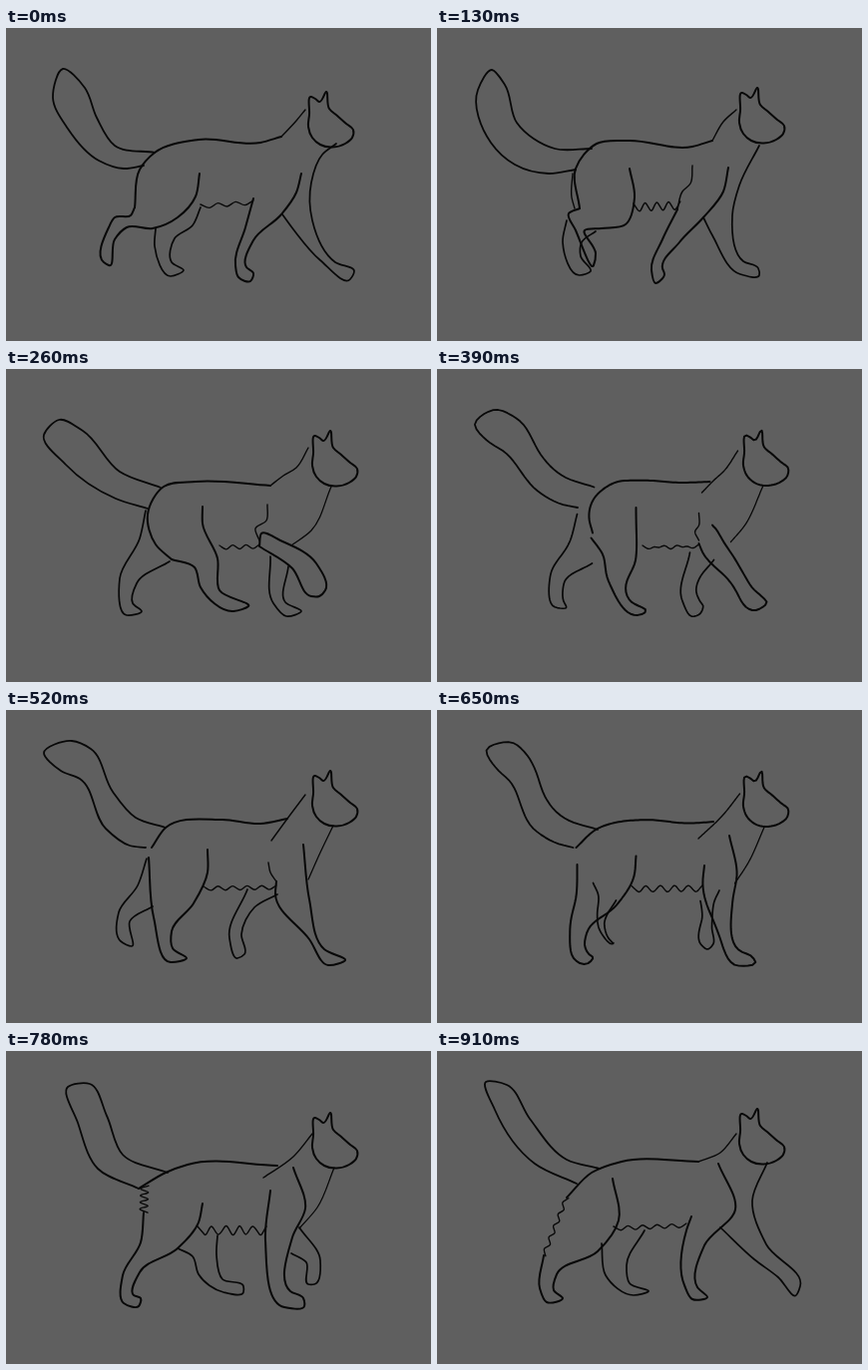
An HTML page that plays this animation: 426x314 px, repeating every 1.04 s.

```html
<!DOCTYPE html>
<html lang="en">
<head>
<meta charset="utf-8">
<title>Cat walk cycle</title>
<style>
  html, body { margin: 0; width: 100%; height: 100%; overflow: hidden; background: #5f5f5f; }
  svg { display: block; width: 100%; height: 100%; }
  path { fill: none; stroke: #080808; stroke-linecap: round; stroke-linejoin: round; }
</style>
</head>
<body>
<svg id="stage" viewBox="0 0 426 314"></svg>
<script>
const HOLD = 130;
const WIDTHS = {
  tail: 1.8, back: 2, nearHind: 2, nearFore: 2, head: 2, farHind: 1.7, farFore: 1.7,
  neck: 1.4, chest: 1.3, belly: 1.4, elbow: 1.4, rump: 1.4
};

const parse = text => text.split(" ").map(p => p.split(",").map(Number));

// Smooth path through points, with tangents weighted by chord length.
function curve(pts) {
  const last = pts.length - 1;
  const sub = (a, b) => [a[0] - b[0], a[1] - b[1]];
  const tangent = i => {
    const before = sub(pts[i], pts[Math.max(i - 1, 0)]);
    const after = sub(pts[Math.min(i + 1, last)], pts[i]);
    const m = Math.hypot(...before), n = Math.hypot(...after);
    return [0, 1].map(k => ((m && before[k] / m * n) + (n && after[k] / n * m)) / (m + n)
      || (m ? before[k] / m : after[k] / n));
  };
  let d = "M" + pts[0];
  for (let i = 0; i < last; i++) {
    const p = pts[i], q = pts[i + 1], third = Math.hypot(...sub(q, p)) / 3;
    const s = tangent(i), t = tangent(i + 1);
    d += `C${p.map((v, k) => v + s[k] * third)} ${q.map((v, k) => v - t[k] * third)} ${q}`;
  }
  return d;
}

const line = text => curve(parse(text));

// Wavy fur between two points.
function wave(x0, y0, x1, y1, waves, size) {
  const dx = x1 - x0, dy = y1 - y0, length = Math.hypot(dx, dy), steps = waves * 2;
  return curve(Array.from({ length: steps + 1 }, (_, i) => {
    const f = i / steps, side = (i % 2 ? size : -size) / length;
    return [x0 + dx * f - dy * side, y0 + dy * f + dx * side];
  }));
}

// Head placed by the tip of the far ear.
const HEAD = parse("-17,23 -15,5 -11,7 -7,10 0,0 3,17 11,24 20,32 27,38 26,46 19,52 -6,53 -14,46 -18,35 -17,23");
const head = (x, y) => curve(HEAD.map(p => [p[0] + x, p[1] + y]));

const reach = {
  head: head(321, 64),
  tail: line("149,125 109,118 91,90 79,60 57,41 47,70 62,101 93,133 118,141 138,138"),
  neck: line("300,82 291,93 276,109"),
  back: line("276,109 255,115 193,112 149,125 134,142 129,180"),
  nearHind: line("129,180 125,188 109,190 103,200 98,235 103,238 109,212 121,200 147,201 172,190 190,169 194,146"),
  farHind: line("150,201 149,219 165,249 178,243 166,235 169,211 187,198 195,180"),
  nearFore: line("248,171 240,200 230,238 233,250 245,254 248,246 241,240 248,213 276,187 291,165 296,146"),
  farFore: line("277,187 288,202 315,233 345,252 349,244 330,235 307,193 306,155 317,127 331,116"),
  belly: wave(195, 179, 248, 175, 3, 2)
};

const plant = {
  head: head(321, 60),
  tail: line("155,121 118,121 80,95 68,57 55,42 41,62 54,115 78,137 112,146 139,142"),
  neck: line("300,82 287,94 276,113"),
  back: line("276,113 256,119 192,113 160,116 139,141 143,181"),
  rump: line("136,146 135,170 138,181"),
  nearHind: line("143,181 132,186 139,203 157,238 159,226 148,203 165,201 189,197 198,170 193,141"),
  farHind: line("130,193 126,215 143,248 154,244 144,229 145,215 159,204"),
  nearFore: line("241,182 226,212 215,243 219,256 228,247 226,241 243,215 267,190 287,164 292,140"),
  farFore: line("267,190 276,208 304,247 323,248 322,241 307,234 296,188 303,158 323,118"),
  belly: wave(197, 180, 244, 178, 4, 4),
  elbow: line("256,138 254,156 246,164 241,182")
};

const lift = {
  head: head(325, 62),
  tail: line("155,119 114,103 77,62 53,51 38,66 60,96 110,130 142,140"),
  neck: line("303,79 291,99 278,107 265,117"),
  back: line("265,117 190,113 158,118 142,146 150,176 166,191"),
  nearHind: line("166,191 189,199 195,219 228,243 243,238 214,222 212,190 197,155 197,138"),
  farHind: line("140,142 134,170 114,210 121,247 136,243 127,235 131,215 164,193"),
  nearFore: line("254,178 287,200 306,228 314,228 320,222 311,195 275,172 256,165 254,178"),
  farFore: line("265,188 268,235 281,248 296,243 280,234 283,198"),
  chest: line("326,118 306,162 286,177"),
  belly: wave(214, 179, 254, 178, 3, 2),
  elbow: line("262,136 261,152 250,160 254,172")
};

const step = {
  head: head(325, 61),
  tail: line("160,118 130,108 107,82 85,39 66,31 38,43 55,61 74,69 100,119 124,136 140,138"),
  neck: line("300,85 282,109 266,131"),
  back: line("282,109 255,114 217,110 160,118 146,138"),
  nearHind: line("143,148 148,208 165,253 181,249 167,239 166,222 188,194 202,163 202,140"),
  farHind: line("141,149 132,176 113,203 115,232 126,237 124,212 147,197"),
  nearFore: line("271,172 270,185 304,230 323,256 340,251 319,240 304,190 298,135"),
  farFore: line("242,180 224,229 232,249 239,245 236,225 249,198 272,185"),
  chest: line("328,116 315,143 303,170"),
  belly: wave(198, 179, 271, 178, 5, 2),
  elbow: line("263,153 265,163 271,172")
};

const pass = {
  head: head(325, 62),
  tail: line("162,122 117,104 101,65 84,33 62,36 72,72 92,118 133,138"),
  neck: line("307,83 288,106 258,127"),
  back: line("272,115 182,114 160,122 133,138"),
  rump: wave(139, 135, 138, 162, 4, 4),
  nearHind: line("138,162 135,192 117,225 118,253 133,256 135,248 128,245 134,222 172,198 193,172 197,153"),
  farHind: line("172,198 187,206 193,224 218,242 238,242 238,236 217,229 211,205 212,185"),
  nearFore: line("265,140 260,190 279,257 299,256 298,248 285,241 287,187 300,158 288,117"),
  farFore: line("286,203 301,212 303,234 309,234 315,210 294,177"),
  chest: line("329,117 312,157 294,178"),
  belly: wave(192, 180, 261, 180, 5, 4)
};

const swing = {
  head: head(321, 58),
  tail: line("163,118 130,109 93,68 70,34 49,31 58,59 98,113 140,133"),
  neck: line("300,83 284,102 262,111"),
  back: line("262,111 185,111 155,122 130,147"),
  rump: wave(130, 147, 107, 205, 5, 2),
  nearHind: line("107,205 103,238 110,252 126,248 117,240 120,224 161,201 182,170 176,128"),
  farHind: line("165,193 169,225 197,245 212,241 193,233 190,215 208,180"),
  nearFore: line("255,166 250,180 248,235 256,249 271,247 261,237 268,195 299,159 282,113"),
  farFore: line("284,177 318,209 342,227 360,245 364,236 330,194 316,150 331,112"),
  belly: wave(177, 178, 250, 175, 5, 2)
};

const newPath = () => document.createElementNS("http://www.w3.org/2000/svg", "path");

function sample(d, count = 60) {
  const path = newPath();
  path.setAttribute("d", d);
  const length = path.getTotalLength();
  return Array.from({ length: count + 1 }, (_, i) => path.getPointAtLength(length * i / count));
}

// Pose halfway between two others, for the parts they share.
function between(a, b) {
  const pose = {};
  for (const part of Object.keys(a).filter(name => b[name])) {
    const end = sample(b[part]);
    pose[part] = "M" + sample(a[part]).map((p, i) => [(p.x + end[i].x) / 2, (p.y + end[i].y) / 2]).join("L");
  }
  return pose;
}

const cycle = [reach, plant, lift, between(lift, step), step, between(step, pass), pass, swing];

const parts = Object.entries(WIDTHS).map(([name, width]) => {
  const path = newPath();
  path.setAttribute("stroke-width", width);
  document.getElementById("stage").append(path);
  return [name, path];
});

let shown = -1;
function render() {
  const index = Math.floor(performance.now() / HOLD) % cycle.length;
  if (index !== shown) {
    shown = index;
    for (const [name, path] of parts) path.setAttribute("d", cycle[index][name] || "");
  }
  requestAnimationFrame(render);
}
render();
</script>
</body>
</html>
```
